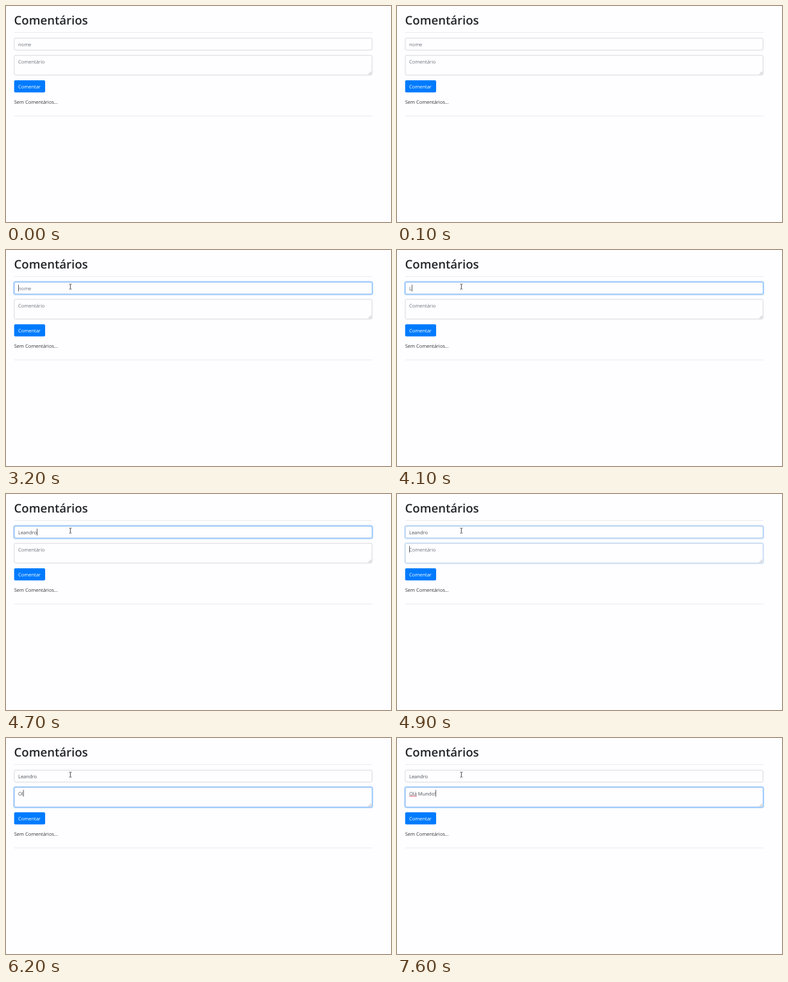
Write an HTML page that moves like this. It is 600x338 px and loops after 8 s.

```html
<!DOCTYPE html>
<html lang="pt">
<head>
<meta charset="utf-8">
<style>
  html, body { margin: 0; width: 100%; height: 100%; overflow: hidden; background: #fefdff; }
  svg { display: block; }
  text { font: 7.5px "Open Sans", "Noto Sans", sans-serif; fill: #6c757d; white-space: pre; text-rendering: geometricPrecision; }
  .title { font-size: 18.6px; font-weight: 600; fill: #212529; }
  .body { fill: #33373b; }
  .typed { fill: #495057; }
  .rule { fill: #ececee; }
  .box { fill: #fefdff; stroke: #d3d6dc; stroke-width: .9; }
  .ring { fill: none; stroke: #007bff; stroke-opacity: .27; stroke-width: 1.6; }
  .glow { fill: none; stroke: #80bdff; stroke-width: .9; }
</style>
</head>
<body>
<svg width="600" height="338" viewBox="0 0 600 338">
  <text class="title" x="12.5" y="29">Comentários</text>
  <rect class="rule" x="13" y="41" width="558" height="1"/>
  <rect class="rule" x="13" y="171.5" width="558" height="1"/>
  <g id="fields"></g>
  <path d="M565 107.2L569.3 102.9M567.5 107.2L569.3 105.4" stroke="#8a8a90" stroke-width=".7"/>
  <rect x="12.7" y="116.3" width="48.3" height="19" rx="2" fill="#007bff"/>
  <text x="19" y="128.8" style="fill:#fff">Comentar</text>
  <text class="body" x="12.7" y="152.6">Sem Comentários...</text>
  <rect id="spell" y="90.6" x="19" height=".9" fill="#e0485c"/>
  <rect id="caret" width="1" height="10.5" fill="#5c5f66"/>
  <path id="pointer" d="M98.4 53.4H99.5L100.3 54L101.1 53.4H102.2M100.3 54V60.6M98.4 61.2H99.5L100.3 60.6L101.1 61.2H102.2" fill="none" stroke="#33333a" stroke-width=".9"/>
</svg>
<script>
const $ = id => document.getElementById(id);
const LOOP = 8000, NAME_FOCUS = 3050, COMMENT_FOCUS = 4840;
const clamp = v => Math.max(0, Math.min(1, v));
const ease = v => v * v * (3 - 2 * v);
const focusAmount = (t, start) => ease(clamp((t - start) / 150));

function makeField(y, height, placeholder, value, keyTimes) {
  const g = document.createElementNS("http://www.w3.org/2000/svg", "g");
  const frame = `x="12.9" y="${y}" width="557.6" height="${height}" rx="2"`;
  g.innerHTML = `<rect class="box" ${frame}/>
    <g><rect class="ring" x="11.9" y="${y - 1}" width="559.6" height="${height + 2}" rx="3"/>
    <rect class="glow" ${frame}/></g><text x="19" y="${y + 12.8}"></text>`;
  $("fields").append(g);
  return { y, placeholder, value, keyTimes, focus: g.children[1], text: g.children[2] };
}

const nameKeys = Array.from("Leandro", (_, i) => 4000 + i * 116);
const nameField = makeField(50.3, 18.7, "nome", "Leandro", nameKeys);
const commentField = makeField(77.2, 30.9, "Comentário", "Olá Mundo!",
  [6000, 6200, 6400, 6500, 6800, 7000, 7100, 7200, 7300, 7600]);

function drawField(field, t, focus) {
  const count = field.keyTimes.filter(k => k <= t).length;
  field.text.textContent = count ? field.value.slice(0, count) : field.placeholder;
  field.text.setAttribute("class", count ? "typed" : "");
  field.focus.style.opacity = focus;
  field.width = count ? field.text.getComputedTextLength() : 0;
  field.lastKey = count ? field.keyTimes[count - 1] : 0;
}

function draw(now) {
  const t = Math.floor(now % LOOP / 100) * 100;
  const toComment = focusAmount(t, COMMENT_FOCUS);
  drawField(nameField, t, focusAmount(t, NAME_FOCUS) * (1 - toComment));
  drawField(commentField, t, toComment);

  const inComment = t >= 4900;
  const active = inComment ? commentField : nameField;
  const since = t - Math.max(active.lastKey, inComment ? 4900 : 3100);
  const caret = $("caret");
  caret.setAttribute("x", 19 + active.width);
  caret.setAttribute("y", active.y + 4);
  caret.style.opacity = since >= 0 && since % 1000 < 500 ? 1 : 0;
  $("pointer").style.opacity = t >= 3100 ? 1 : 0;
  $("spell").setAttribute("width", t >= 6500 ? commentField.text.getSubStringLength(0, 3) : 0);
  requestAnimationFrame(draw);
}
requestAnimationFrame(draw);
</script>
</body>
</html>
```
